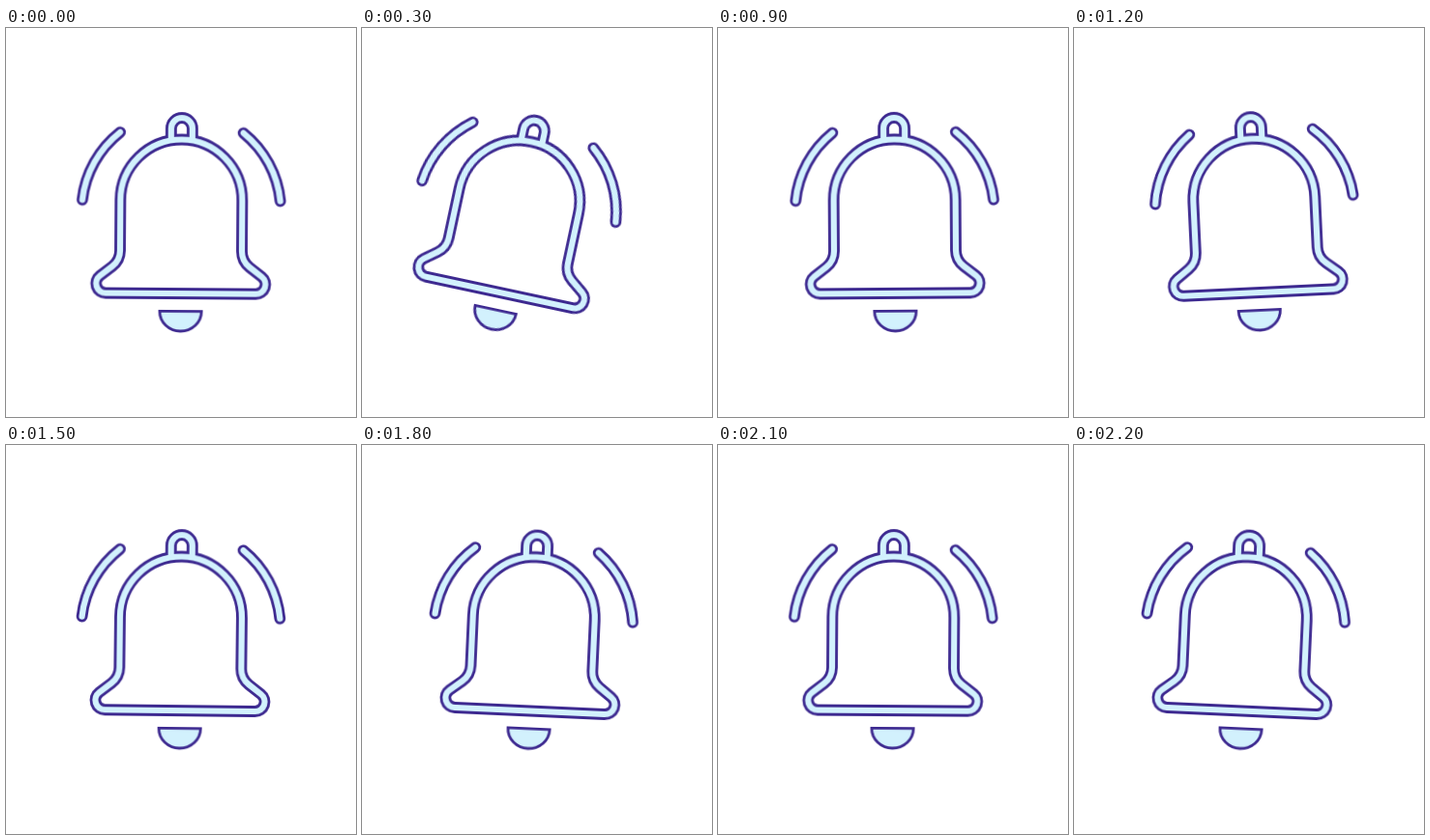
Recreate the animation shown at these times as an HTML page. Size 362 px wide and 403 px high, loop 2300 ms.

```html
<!DOCTYPE html>
<html lang="en">
<head>
<meta charset="utf-8">
<title>Ringing bell</title>
<style>
  html, body { margin: 0; width: 100%; height: 100%; overflow: hidden; background: #fff; }
  svg { display: block; width: 362px; height: 403px; }

  .bell {
    transform-origin: 167px 86px;
    animation: swing 2300ms step-end infinite;
  }
  .tube { fill: none; }
  .edge { stroke: #3d2990; stroke-width: 11.8; }
  .core { stroke: #d2f1fd; stroke-width: 6.2; }
  .clapper { fill: #d2f1fd; stroke: #3d2990; stroke-width: 2.8; }

  /* Each pose is held, then snaps to the next. */
  @keyframes swing {
    0%      { transform: rotate(.4deg); }
    13.043% { transform: rotate(12.1deg); }
    26.087% { transform: rotate(6.9deg); }
    39.130% { transform: rotate(-.4deg); }
    52.174% { transform: rotate(-2.7deg); }
    65.217% { transform: rotate(.65deg); }
    78.261% { transform: rotate(2.6deg); }
    86.957% { transform: rotate(-2.15deg); }
    91.304% { transform: rotate(.4deg); }
    95.652%, 100% { transform: rotate(2.6deg); }
  }
</style>
</head>
<body>
<svg viewBox="0 0 362 403" aria-label="Ringing bell">
  <defs>
    <path id="wave" stroke-linecap="round" d="M118.2 108.3A104 104 0 0 0 79.6 178.6"/>
    <g id="frame">
      <path d="M119 178.5A63 63 0 0 1 245 178.5V231Q245 241 253 247.3L265.7 257.1
               A10 10 0 0 1 259.6 275H104.4A10 10 0 0 1 98.3 257.1L111 247.3Q119 241 119 231Z"/>
      <path d="M171 115V104A11 11 0 0 1 193 104V115"/>
      <use href="#wave"/>
      <use href="#wave" transform="translate(364 0) scale(-1 1)"/>
    </g>
  </defs>
  <g class="bell">
    <use href="#frame" class="tube edge"/>
    <use href="#frame" class="tube core"/>
    <path class="clapper" d="M160.4 293.4H203.6A21.6 20.6 0 0 1 160.4 293.4Z"/>
  </g>
</svg>
</body>
</html>
```
